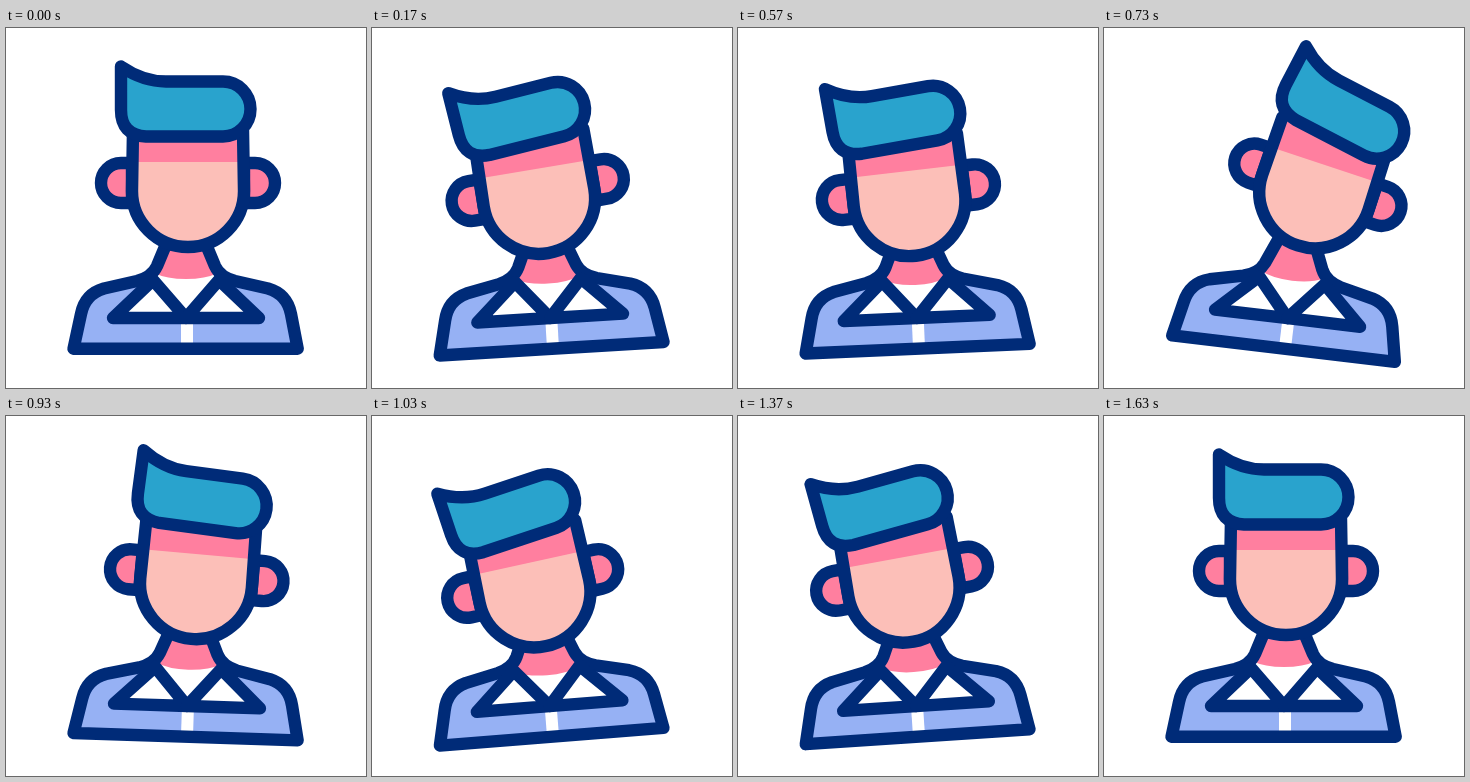
Recreate the animation shown at these times as an HTML page. Size 360x360 px, loop 2000 ms.

```html
<!DOCTYPE html>
<html lang="en">
<head>
<meta charset="utf-8">
<title>Swaying man</title>
<style>
  html, body { margin: 0; width: 100%; height: 100%; overflow: hidden; background: #fff; }
  svg { display: block; width: 100%; height: 100%; }
  .line { stroke: #002b78; stroke-width: 12.4; stroke-linecap: round; stroke-linejoin: round; }
  .shirt { fill: #96b1f4; }
  .shade { fill: #ff7f9f; }
  .skin { fill: #fcbfb8; }
  .hair { fill: #29a3cd; }
  .white { fill: #fff; }
  .none { fill: none; }
</style>
</head>
<body>
<svg viewBox="0 0 360 360">
  <clipPath id="neck"><path d="M148 249L161 208H199L212 249L180 287Z"/></clipPath>
  <g id="body">
    <path class="shirt" d="M68 321L75 286Q79 267 98 261L131 253L147 249H213L229 253L262 261Q281 267 285 286L292 321Z"/>
    <path class="white" d="M148 249L161 214H199L212 249L180 287Z"/>
    <g clip-path="url(#neck)">
      <path id="shadow" class="shade" d="M140 190H220V240Q206 251 180 251Q154 251 140 240Z"/>
    </g>
    <path class="white" d="M175 290H187V320H175Z"/>
    <path class="line none" d="M161 214L151 238Q146 249 131 253L98 260.500Q79 266 75 286L67.500 320.700H291.700L285 286Q281 266 262 260.500L229 253Q214 249 209 238L199 214"/>
    <path class="line white" d="M147 252L107 290H180Z"/>
    <path class="line white" d="M213 252L253 290H180Z"/>
  </g>
  <g id="head">
    <path class="line shade" d="M126 135H115A20 20 0 0 0 115 175H126Z"/>
    <path class="line shade" d="M238 135H249A20 20 0 0 1 249 175H238Z"/>
    <path class="skin" d="M126 108V163A56 56 0 0 0 238 163V108Z"/>
    <path class="shade" d="M127 98H237L238 134H126Z"/>
    <path class="line none" d="M127 102L126 163A56 56 0 0 0 238 163L237 102"/>
    <path id="hair" class="line hair" d="M115 38.500Q137 53.500 160 53.500H217A27.300 27.300 0 0 1 217 108.500H140Q115 107 115 82Z"/>
  </g>
</svg>
<script>
  const LOOP = 2000, FPS = 30;
  // Each key: frame, sway (-1 is full left), lean (0 is upright), time warp of the easing
  const keys = [
    [0, 0, 0, 1],
    [12, -1, 1, 1],
    [23.5, 0.82, 1, 1],
    [35, -1, 1, 1],
    [49, 0, 0, 0.69]
  ];
  const [body, shadow, head, hair] =
    ["body", "shadow", "head", "hair"].map(id => document.getElementById(id));
  const mix = (a, b, p) => a + (b - a) * p;
  const ease = p => p * p * (3 - 2 * p);

  function poseAt(frame) {
    const i = keys.findIndex(key => key[0] > frame);
    if (i < 0) return [0, 0];
    const [from, to] = [keys[i - 1], keys[i]];
    const p = ease(((frame - from[0]) / (to[0] - from[0])) ** to[3]);
    return [mix(from[1], to[1], p), mix(from[2], to[2], p)];
  }

  function draw(ms) {
    // Frame starts are rounded to 10 ms, so some begin slightly early
    const [sway, lean] = poseAt(Math.floor((ms % LOOP) * FPS / 1000 + 0.15));
    const dx = 43.3 * sway;
    const dy = -10 * sway + 6 * sway * sway + 6 * lean;
    body.setAttribute("transform", `rotate(${9.2 * sway} 180 320)`);
    shadow.setAttribute("transform", `translate(0 ${0.65 * dy})`);
    head.setAttribute("transform", `translate(${dx} ${dy}) rotate(${25 * sway} 182.5 155)`);
    hair.setAttribute("transform", `rotate(${12.5 * sway} 190 108)`);
  }

  function tick() {
    draw(performance.now());
    requestAnimationFrame(tick);
  }
  tick();
</script>
</body>
</html>
```
